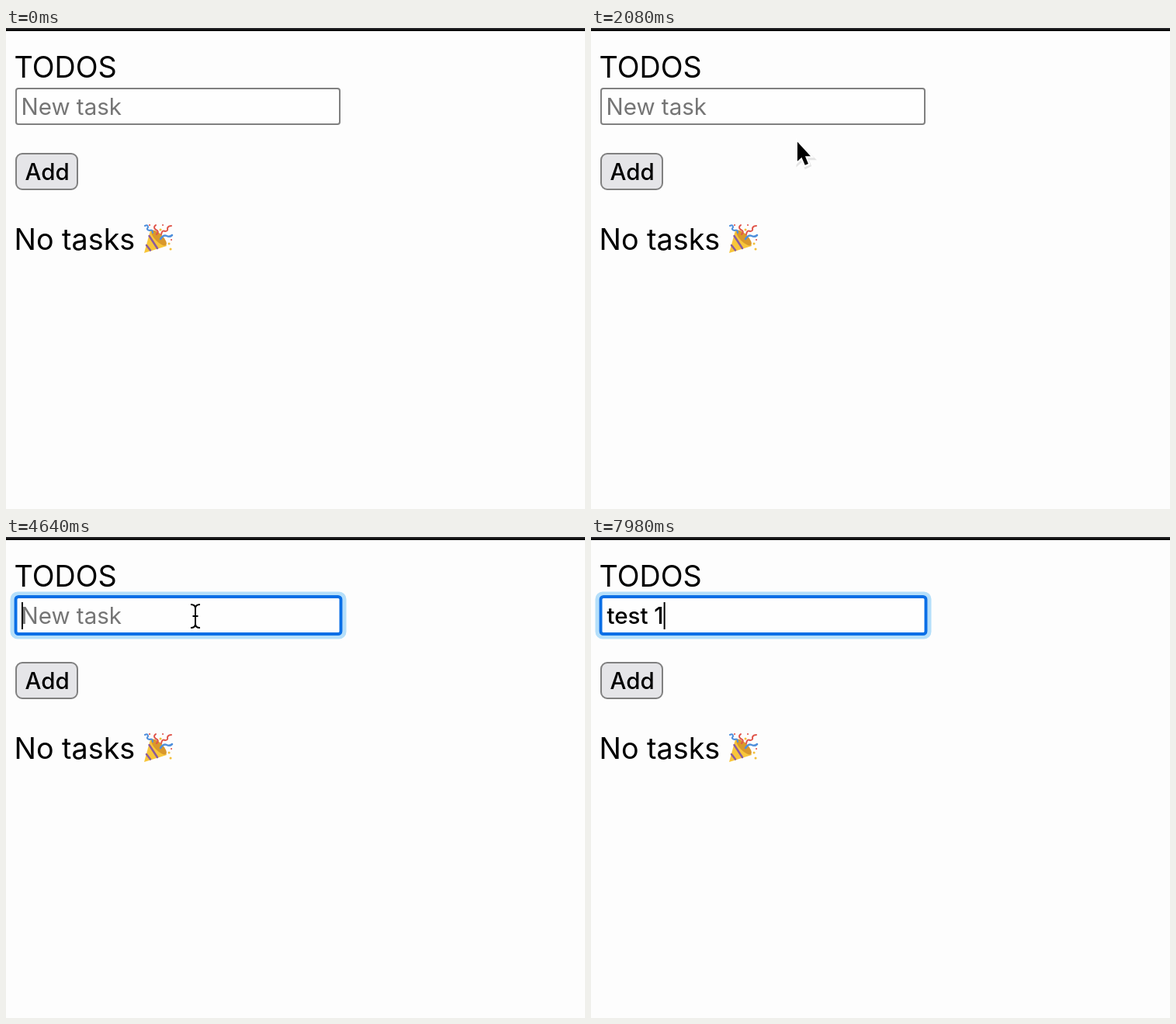
These frames come from a looping animation (746 by 620 pixels, 8 s). An HTML page:

```html
<!DOCTYPE html>
<html lang="en">
<head>
<meta charset="utf-8">
<title>Todos</title>
<style>
  html, body { margin: 0; width: 100%; height: 100%; overflow: hidden; background: #fdfdfd; }
  svg { display: block; width: 746px; height: 620px; }
  text { font-family: Inter, "Open Sans", sans-serif; font-optical-sizing: none; fill: #000; white-space: pre; }
  .page { font-size: 37.7px; }
  .field { font-size: 29.5px; font-weight: 500; }
  #hint { fill: #757575; font-weight: 400; }
</style>
</head>
<body>
<svg viewBox="0 0 746 620">
  <rect width="746" height="620" fill="#fdfdfd"/>
  <rect width="746" height="4" fill="#000"/>
  <rect width="746" height="2" fill="#242426"/>

  <text class="page" x="10.5" y="63.5">TODOS</text>

  <rect x="13" y="78" width="417" height="46" rx="3" fill="#fefefe" stroke="#808080" stroke-width="2"/>
  <g id="ring" fill="none">
    <rect x="8" y="73" width="428" height="56" rx="7" stroke="#b5dffa" stroke-width="5"/>
    <rect x="12.500" y="77" width="419" height="48" rx="3.500" fill="#fefefe" stroke="#0a6fe6" stroke-width="4"/>
  </g>
  <text id="hint" class="field" x="19.5" y="112">New task</text>
  <text id="value" class="field" x="20.5" y="112"></text>
  <rect id="caret" y="84" width="2" height="35"/>

  <rect x="13" y="162" width="79" height="46" rx="8" fill="#e5e5e8" stroke="#808080" stroke-width="2"/>
  <text class="field" x="24.5" y="196">Add</text>

  <text class="page" x="10.5" y="286">No tasks</text>

  <g fill="none" stroke-linecap="round">
    <path d="M178 290 L186 261 Q201 264 207 281 Z" fill="#f8c63a"/>
    <path d="M184.500 268 L195 284 M181 280 L186 286.500" stroke="#8b5c9c" stroke-width="2.500"/>
    <ellipse cx="197" cy="270.500" rx="13" ry="5" transform="rotate(45 197 270.500)" fill="#d9982c"/>
    <path d="M179 255 q4 -2 4 2 q-3 3 2 4 q4 -2 4 3" stroke="#4f8fdc" stroke-width="2"/>
    <path d="M194 266 q4 -4 -1 -6 q-4 -3 0 -6" stroke="#e0554a" stroke-width="2"/>
    <path d="M200 266 q1 -6 5 -4 q4 0 3 -4 q1 -3 5 -3" stroke="#e0554a" stroke-width="2"/>
    <path d="M199 272 q4 -6 8 -4 q4 2 7 -1" stroke="#4f8fdc" stroke-width="2.500"/>
    <path d="M202 254 h.1 M213 273 h.1 M185 254 h.1" stroke="#e0554a" stroke-width="2"/>
    <path d="M210 278 h.1 M212 285 h.1 M199 260 h.1" stroke="#f3c03c" stroke-width="3"/>
  </g>

  <g id="arrow">
    <path d="M1 3 V27 L6.500 22 L11 32 L15 30 L11 21 H19 Z" fill="#ccc" stroke="#ccc" stroke-width="5" opacity=".5"/>
    <path d="M0 0 V25 L5.500 20 L9.800 30 L14 28.200 L10 18.500 H17 Z" stroke="#fff" stroke-width="4" paint-order="stroke"/>
  </g>
  <g id="beam" fill="none">
    <path id="beamShape" d="M238 87 Q244 87 244 92 V112 Q244 117 238 117 M250 87 Q244 87 244 92 M244 112 Q244 117 250 117 M240.500 102 H247.500"/>
    <use href="#beamShape" stroke="#fff" stroke-width="5"/>
    <use href="#beamShape" stroke="#000" stroke-width="2"/>
  </g>
</svg>
<script>
  const LOOP = 8000, FOCUS = 3200, BLINK = 500;
  const [ring, hint, value, caret, arrow, beam] =
    ["ring", "hint", "value", "caret", "arrow", "beam"].map(id => document.getElementById(id));

  // time, x, y of the pointer tip
  const path = [
    [720, 383, 69], [860, 350, 82], [1000, 312, 101], [1140, 287, 117],
    [1420, 266, 147], [2080, 266, 147], [2300, 252, 118], [2520, 244, 101]
  ];

  // time of each key press and the text after it
  const typing = [
    [FOCUS, ""], [5680, "t"], [5900, "te"], [6100, "tes"],
    [6260, "test"], [6480, "test "], [6700, "test 1"]
  ];

  const show = (node, on) => node.style.display = on ? "" : "none";

  function pointer(t) {
    const next = path.findIndex(p => p[0] > t);
    if (next < 0) return path[path.length - 1].slice(1);
    if (next === 0) return path[0].slice(1);
    const [a, b] = [path[next - 1], path[next]];
    const k = (t - a[0]) / (b[0] - a[0]);
    return [1, 2].map(i => a[i] + (b[i] - a[i]) * k);
  }

  function render(t) {
    const focused = t >= FOCUS;
    const [pressed, text] = typing.filter(k => k[0] <= t).pop() || typing[0];

    show(ring, focused);
    show(hint, !text);
    if (value.textContent !== text) value.textContent = text;
    show(caret, focused && Math.floor((t - pressed) / BLINK) % 2 === 0);
    caret.setAttribute("x", text ? 20.5 + value.getComputedTextLength() : 20);

    show(arrow, t >= path[0][0] && !focused);
    arrow.setAttribute("transform", `translate(${pointer(t).join(" ")})`);
    show(beam, focused && !text);
  }

  const start = performance.now();
  function tick() {
    render((performance.now() - start) % LOOP);
    requestAnimationFrame(tick);
  }
  tick();
</script>
</body>
</html>
```
